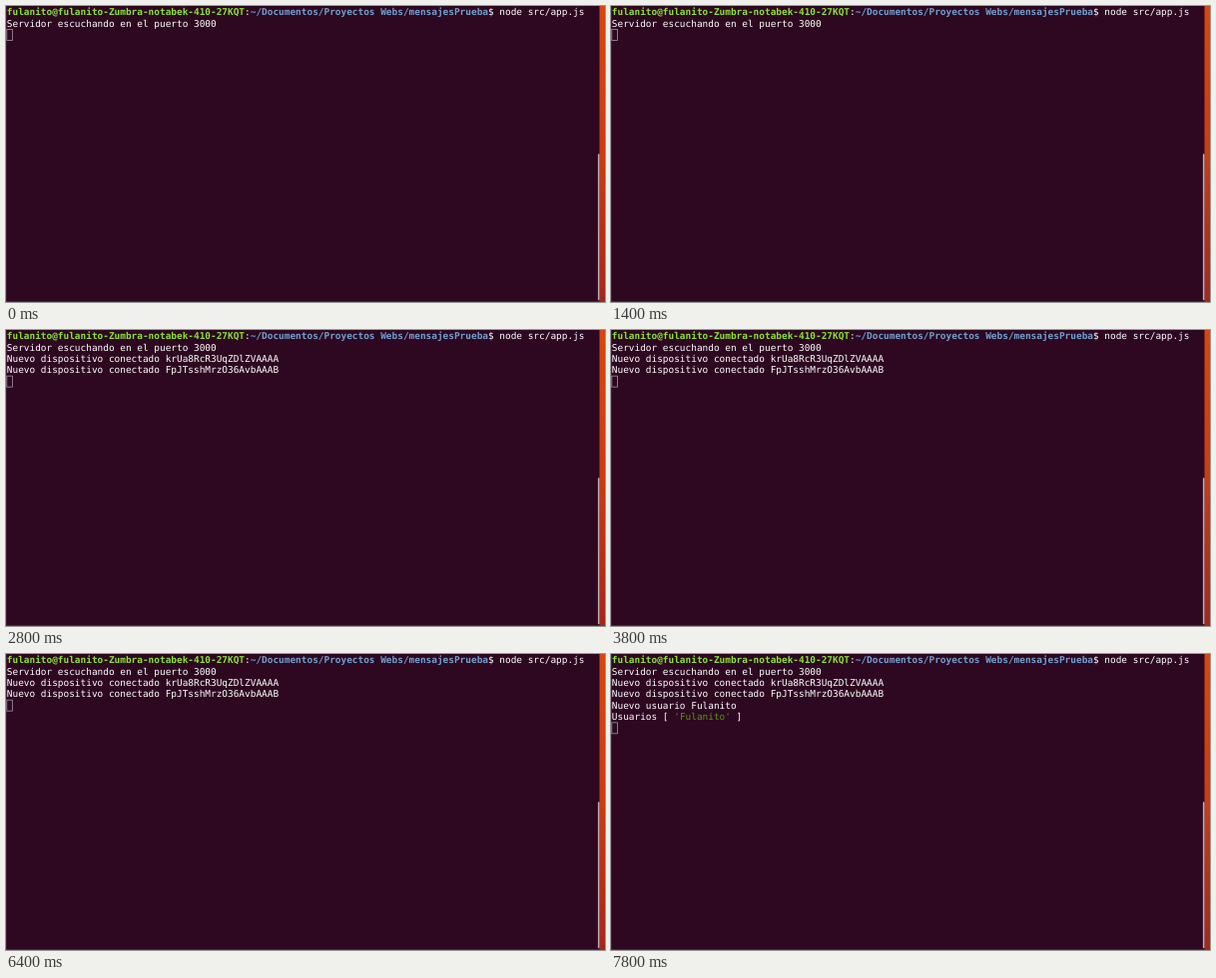
Write an HTML page that moves like this. It is 600 px wide and 297 px high and loops after 8000 ms.

```html
<!DOCTYPE html>
<html lang="es">
<head>
<meta charset="utf-8">
<title>Terminal</title>
<style>
  html, body { margin: 0; width: 100%; height: 100%; overflow: hidden; background: #2d0820; }
  svg { display: block; width: 100%; height: 100%; }
  text {
    font: 9.44px "DejaVu Sans Mono", monospace;
    fill: #fff;
    white-space: pre;
    text-rendering: geometricPrecision;
  }
  .user, .path { font-weight: bold; }
  .user { fill: #8ae234; }
  .path { fill: #729fcf; }
  .string { fill: #4e9a06; }
</style>
</head>
<body>
<svg viewBox="0 0 600 297">
  <defs>
    <linearGradient id="desktop" x2="0" y2="1">
      <stop stop-color="#d7470f"/>
      <stop offset=".5" stop-color="#c93c14"/>
      <stop offset="1" stop-color="#a3281b"/>
    </linearGradient>
  </defs>
  <rect width="600" height="297" fill="#2d0820"/>
  <rect y="296" width="600" height="1" fill="#6e1830"/>
  <rect width=".5" height="297" fill="#5a3048"/>
  <rect x="594.5" width="5.5" height="297" fill="url(#desktop)"/>
  <rect x="592.9" y="148.2" width="1.6" height="147" rx=".8" fill="#b9aeb3"/>
  <g id="lines"></g>
  <rect id="cursor" x=".8" width="5.6" height="11" fill="none" stroke="#a3949d" stroke-width=".8"/>
</svg>
<script>
const LOOP = 8000, LINE_HEIGHT = 11.34, TOP = 0.6, BASELINE = 8.8;

const span = (kind, text) => `<tspan class="${kind}">${text}</tspan>`;

// Each line of output and the time at which it is printed.
const output = [
  [0, span("user", "fulanito@fulanito-Zumbra-notabek-410-27KQT") + ":" +
      span("path", "~/Documentos/Proyectos Webs/mensajesPrueba") + "$ node src/app.js"],
  [0, "Servidor escuchando en el puerto 3000"],
  [1600, "Nuevo dispositivo conectado krUa8RcR3UqZDlZVAAAA"],
  [2500, "Nuevo dispositivo conectado FpJTsshMrzO36AvbAAAB"],
  [6700, "Nuevo usuario Fulanito"],
  [6700, "Usuarios [ " + span("string", "'Fulanito'") + " ]"]
];

const lines = document.getElementById("lines");
const cursor = document.getElementById("cursor");

lines.innerHTML = output.map(([, text], row) =>
  `<text x="0.8" y="${TOP + BASELINE + row * LINE_HEIGHT}">${text}</text>`).join("");

const start = performance.now();

function draw() {
  const time = (performance.now() - start) % LOOP;
  const printed = output.filter(([at]) => at <= time).length;
  [...lines.children].forEach((line, row) => {
    line.style.display = row < printed ? "" : "none";
  });
  cursor.setAttribute("y", TOP + 0.2 + printed * LINE_HEIGHT);
  requestAnimationFrame(draw);
}
draw();
</script>
</body>
</html>
```
